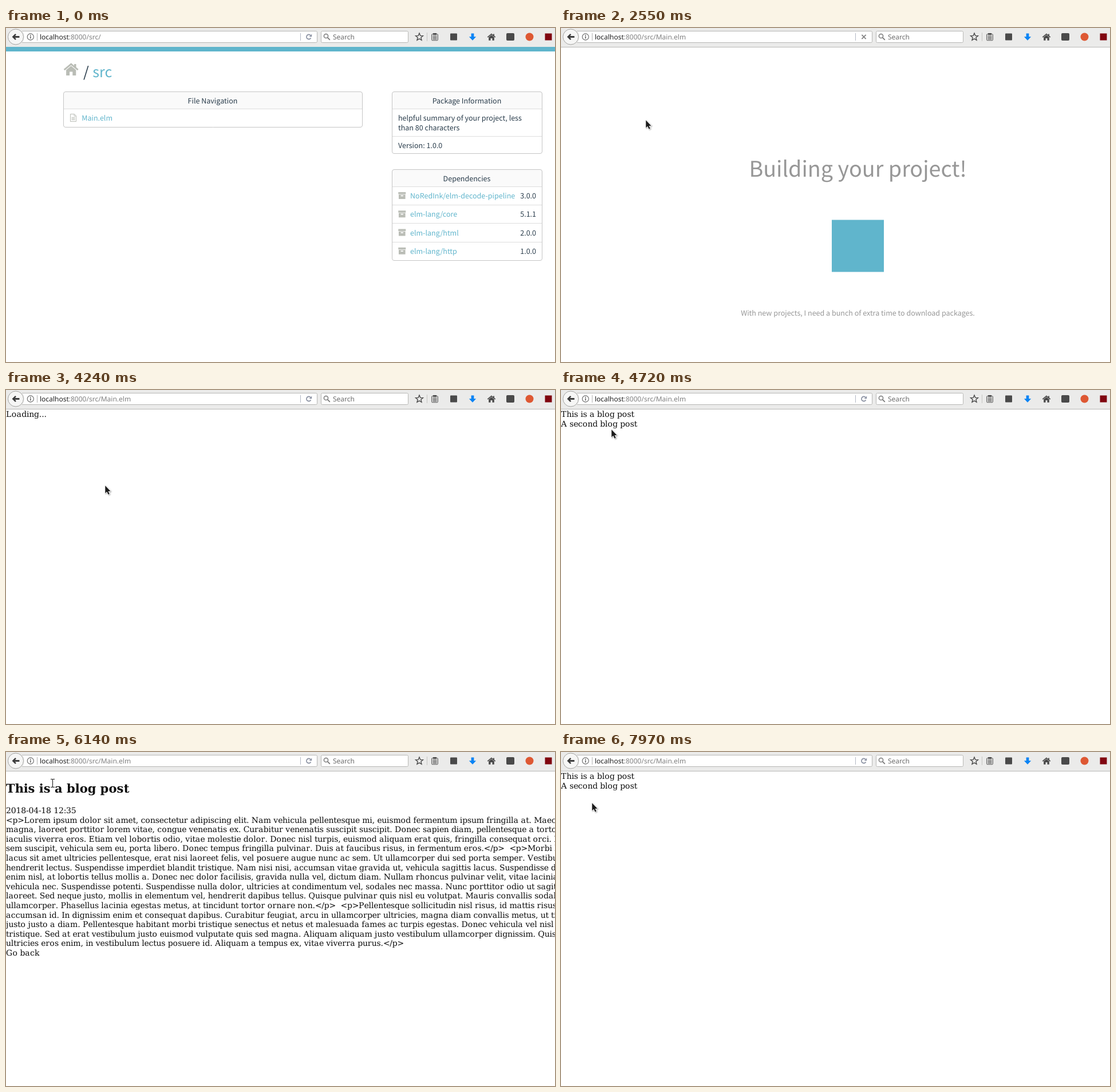
An HTML page with a canvas for the animation above (8000 ms loop, 959 by 584 pixels).

```html
<!DOCTYPE html>
<html lang="en">
<head>
<meta charset="utf-8">
<title>Blog reader</title>
<style>
html, body { margin: 0; width: 100%; height: 100%; overflow: hidden; background: #fff; }
canvas { display: block; }
</style>
</head>
<body>
<canvas id="stage" width="959" height="584"></canvas>
<script>
const ctx = document.getElementById('stage').getContext('2d');
ctx.textRendering = 'geometricPrecision';

const LOOP = 8000;
const ZOOM = 0.875; // the browser window is shown reduced
const UI = '"Noto Sans", "Open Sans", sans-serif';
const SANS = '"Noto Sans CJK JP", "Noto Sans CJK SC", "Noto Sans CJK KR", "Noto Sans CJK", sans-serif';
const SERIF = '"DejaVu Serif", serif';
const BLUE = '#60b5cc', INK = '#293c4b', GREY = '#babdb6', DARK = '#4a4a4a';
const BODY = 12.53; // page text size

const POST = [
  '<p>Lorem ipsum dolor sit amet, consectetur adipiscing elit. Nam vehicula pellentesque mi, euismod fermentum ipsum fringilla at. Maecenas',
  'magna, laoreet porttitor lorem vitae, congue venenatis ex. Curabitur venenatis suscipit suscipit. Donec sapien diam, pellentesque a tortor',
  'iaculis viverra eros. Etiam vel lobortis odio, vitae molestie dolor. Donec nisl turpis, euismod aliquam erat quis, fringilla consequat orci. Nam',
  'sem suscipit, vehicula sem eu, porta libero. Donec tempus fringilla pulvinar. Duis at faucibus risus, in fermentum eros.</p>\u00a0 <p>Morbi lorem',
  'lacus sit amet ultricies pellentesque, erat nisi laoreet felis, vel posuere augue nunc ac sem. Ut ullamcorper dui sed porta semper. Vestibulum',
  'hendrerit lectus. Suspendisse imperdiet blandit tristique. Nam nisi nisi, accumsan vitae gravida ut, vehicula sagittis lacus. Suspendisse dapibus',
  'enim nisl, at lobortis tellus mollis a. Donec nec dolor facilisis, gravida nulla vel, dictum diam. Nullam rhoncus pulvinar velit, vitae lacinia',
  'vehicula nec. Suspendisse potenti. Suspendisse nulla dolor, ultricies at condimentum vel, sodales nec massa. Nunc porttitor odio ut sagittis',
  'laoreet. Sed neque justo, mollis in elementum vel, hendrerit dapibus tellus. Quisque pulvinar quis nisl eu volutpat. Mauris convallis sodales',
  'ullamcorper. Phasellus lacinia egestas metus, at tincidunt tortor ornare non.</p>\u00a0 <p>Pellentesque sollicitudin nisl risus, id mattis risus lacus',
  'accumsan id. In dignissim enim et consequat dapibus. Curabitur feugiat, arcu in ullamcorper ultricies, magna diam convallis metus, ut tincidunt',
  'justo justo a diam. Pellentesque habitant morbi tristique senectus et netus et malesuada fames ac turpis egestas. Donec vehicula vel nisl in',
  'tristique. Sed at erat vestibulum justo euismod vulputate quis sed magna. Aliquam aliquam justo vestibulum ullamcorper dignissim. Quisque',
  'ultricies eros enim, in vestibulum lectus posuere id. Aliquam a tempus ex, vitae viverra purus.</p>',
  'Go back'
];

const PACKAGES = [
  ['NoRedInk/elm-decode-pipeline', '3.0.0'],
  ['elm-lang/core', '5.1.1'],
  ['elm-lang/html', '2.0.0'],
  ['elm-lang/http', '1.0.0']
];

const SHAPES = {
  arrow: 'M0 0V13.2L3 10.4L5.3 15.4L7.5 14.4L5.3 9.6H9.3Z',
  hand: 'M2 1.2Q2 0 3.2 0T4.4 1.2V6Q6 5.2 6.6 6.4Q8.4 5.8 8.9 7.1Q11 6.7 11.2 8.6V12Q11 14 10 15V17.5H4V15.5Q1.5 12.5 .2 10Q-.2 8.4 2 9.4Z',
  beam: 'M-3.5 -7H-1Q0 -7 0 -6V6Q0 7 -1 7H-3.5M3.5 -7H1Q0 -7 0 -6M0 6Q0 7 1 7H3.5',
  cross: 'M-3.6 -3.6L3.6 3.6M-3.6 3.6L3.6 -3.6',
  handle: 'M0 0L4 4',
  back: 'M-7 0L-1 -6L1 -4L-1.4 -1.5H7V1.5H-1.4L1 4L-1 6Z',
  down: 'M-2.5 -6.5H2.5V-.5H6.5L0 6.5L-6.5 -.5H-2.5Z',
  house: 'M-8.6 1L0 -6.2L8.6 1V10.5H2.6V4H-2.6V10.5H-8.6ZM5.4 -9.5H8.8V-2.5L5.4 -5.4Z',
  roof: 'M-12 .6L0 -9.4L12 .6',
  page: 'M.5 .5H7.5L10.5 3.5V13.5H.5ZM7 .5V4H10.5M2.5 6.5H8.5M2.5 8.5H8.5M2.5 10.5H8.5',
  box: 'M0 0H13V3.4H0ZM.7 4.2H12.3V12H.7ZM4.4 5.6V7.2H8.6V5.6Z'
};
for (const k in SHAPES) SHAPES[k] = new Path2D(SHAPES[k]);

function at(x, y, s, draw) {
  ctx.save();
  ctx.translate(x, y);
  ctx.scale(s, s);
  draw();
  ctx.restore();
}

function fill(name, x, y, color, s = 1) {
  at(x, y, s, () => { ctx.fillStyle = color; ctx.fill(SHAPES[name], 'evenodd'); });
}

function stroke(name, x, y, color, width = 1, s = 1) {
  at(x, y, s, () => { ctx.strokeStyle = color; ctx.lineWidth = width; ctx.stroke(SHAPES[name]); });
}

function rect(x, y, w, h, color) {
  ctx.fillStyle = color;
  ctx.fillRect(x, y, w, h);
}

function rounded(x, y, w, h, r, color, line) {
  ctx.beginPath();
  ctx.roundRect(x, y, w, h, r);
  if (color) { ctx.fillStyle = color; ctx.fill(); }
  if (line) { ctx.strokeStyle = line; ctx.lineWidth = 1; ctx.stroke(); }
}

function disc(x, y, r, color, line, width = 1) {
  ctx.beginPath();
  ctx.arc(x, y, r, 0, 7);
  if (color) { ctx.fillStyle = color; ctx.fill(); }
  if (line) { ctx.strokeStyle = line; ctx.lineWidth = width; ctx.stroke(); }
}

function text(str, x, y, size, family, color, align = 'left') {
  ctx.font = `${size}px ${family}`;
  ctx.textAlign = align;
  ctx.fillStyle = color;
  ctx.fillText(str, x, y);
  return ctx.measureText(str).width;
}

const sans = (str, x, y, color = INK, align) => text(str, x, y, BODY, SANS, color, align);

// hinted text: every letter advances by whole pixels before the zoom
const advances = {};
function serif(str, y, font = '16px') {
  const known = advances[font] ??= {};
  at(0, y, ZOOM, () => {
    ctx.font = `${font} ${SERIF}`;
    ctx.textAlign = 'left';
    ctx.fillStyle = '#0c0c0c';
    let x = 0;
    for (const c of str) {
      if (x * ZOOM > 959) break;
      ctx.fillText(c, x, 0);
      x += known[c] ??= Math.round(ctx.measureText(c).width);
    }
  });
}

function home(x, y, s, color) {
  fill('house', x, y, color, s);
  stroke('roof', x, y, color, 2.8, s);
}

function star(x, y) {
  ctx.beginPath();
  for (let i = 0; i < 10; i++) {
    const r = i % 2 ? 3 : 6.8, a = i * Math.PI / 5;
    ctx.lineTo(x + r * Math.sin(a), y - r * Math.cos(a));
  }
  ctx.closePath();
  ctx.strokeStyle = DARK;
  ctx.lineWidth = 1.4;
  ctx.stroke();
}

function reload(x, y) {
  ctx.strokeStyle = ctx.fillStyle = '#8b92a3';
  ctx.lineWidth = 1.8;
  ctx.beginPath();
  ctx.arc(x, y, 4, 0.5, 5.5);
  ctx.stroke();
  ctx.beginPath();
  ctx.moveTo(x + 5.2, y - 5);
  ctx.lineTo(x + 5.2, y - .3);
  ctx.lineTo(x + .5, y - .3);
  ctx.fill();
}

function toolbar(t) {
  rect(0, 0, 959, 33, '#ebebea');
  rect(0, 33, 959, 1, '#b9b9b7');
  rounded(24.5, 5.5, 519, 20, 2, '#fff', '#b7b7b5');
  disc(17, 15.5, 15, '#ebebea');
  disc(17, 15.5, 13.5, '#f6f6f5', '#a3a3a1');
  fill('back', 17, 15.5, '#3c3c3c', .92);
  disc(42.8, 15.5, 5.6, null, '#666', 1.1);
  rect(42, 14.5, 1.6, 4, '#666');
  rect(42, 12, 1.6, 1.6, '#666');
  rect(54, 9, 1, 13, '#b0b0b0');
  rect(514, 9, 1, 13, '#b3b8c4');

  const w = text('localhost', 59, 19.8, 12.03, UI, '#222');
  text(':8000/src/' + (t >= 1660 ? 'Main.elm' : ''), 59 + w, 19.8, 12.03, UI, '#808080');

  if (t >= 1760 && t < 3840) stroke('cross', 529, 15.5, '#858585', 1.8);
  else reload(529, 15.5);

  rounded(550.5, 5.5, 152, 20, 2, '#fff', '#b7b7b5');
  disc(559, 14, 3.6, null, '#777', 1.5);
  stroke('handle', 561.8, 16.8, '#777', 1.8);
  text('Search', 571, 19.8, 12.03, UI, '#6e6e6e');

  star(722, 15.8);
  rect(735, 8, 1, 15, '#c4c4c2');
  rounded(743.7, 10.7, 10.6, 11, 1, null, DARK);
  rect(746, 9, 6, 3, DARK);
  for (let i = 0; i < 3; i++) rect(745.5, 13.4 + i * 2.6, 7, 1.3, DARK);
  rounded(776, 9.5, 12, 12, 1, DARK);
  fill('down', 815, 15.6, '#0a84f5', .95);
  home(848, 15.8, .56, DARK);
  rounded(874, 9, 14, 13, 2, DARK);
  disc(914.5, 15.5, 7, '#de5833');
  rect(941.5, 9.5, 12, 12, '#800610');
}

function panel(x, y, w, h, title, lines) {
  rounded(x + .5, y + .5, w, h, 3.5, '#fff');
  rounded(x + .5, y + .5, w, 30, [3.5, 3.5, 0, 0], '#fafafa');
  for (const ly of lines) rect(x + 1, ly, w - 1, 1, '#dedede');
  rounded(x + .5, y + .5, w, h, 3.5, null, '#c5c5c5');
  sans(title, x + w / 2, y + 20.7, INK, 'center');
}

function files(t) {
  rect(0, 33, 959, 8, BLUE);
  home(113.7, 72.5, 1, GREY);
  text('/', 135, 85.7, 25.07, SANS, INK);
  text('src', 151.3, 85.7, 25.07, SANS, BLUE);

  panel(100, 111, 522, 62, 'File Navigation', [141]);
  stroke('page', 112, 150, GREY);
  const w = sans('Main.elm', 132.3, 161.8, BLUE);
  if (t >= 970) rect(132, 163, w, 1, BLUE);
  if (t >= 1460 && t < 1700) {
    ctx.setLineDash([1, 1]);
    rounded(111.5, 147.5, 76, 20, 0, null, BLUE);
    ctx.setLineDash([]);
  }

  panel(674, 111, 262, 108, 'Package Information', [141, 189]);
  sans('helpful summary of your project, less', 685, 161.8);
  sans('than 80 characters', 685, 179.4);
  sans('Version: 1.0.0', 685, 210);

  panel(674, 247, 262, 159, 'Dependencies', [277, 309, 341, 374]);
  PACKAGES.forEach(([name, version], i) => {
    const y = 298 + i * 32.25;
    fill('box', 685.3, y - 11, GREY);
    sans(name, 706, y, BLUE);
    sans(version, 926, y, INK, 'right');
  });
}

function building(t) {
  text('Building your project!', 518.5, 260, 37.7, SANS, '#979797', 'center');
  const side = t < 3680 ? 91 : 88;
  rect(518.5 - side / 2, 381 - side / 2, side, side, BLUE);
  sans('With new projects, I need a bunch of extra time to download packages.', 518.5, 503, '#979797', 'center');
}

function list() {
  serif('This is a blog post', 47);
  serif('A second blog post', 63.6);
}

function post() {
  serif('This is a blog post', 71.4, 'bold 24px');
  serif('2018-04-18 12:35', 106.9);
  POST.forEach((line, i) => serif(line, 106.9 + (i + 1) * 16.6));
}

// start, end, from, via, to: each a quadratic curve, stepped every 40 ms
const inOut = p => p * p * (3 - 2 * p);
const out = p => 1 - (1 - p) ** 1.6;
const linear = p => p;
const MOVES = [
  [2920, 3240, [148, 161], [178, 192], [226, 211], inOut],
  [3240, 3400, [226, 211], [237, 211], [238, 195], inOut],
  [4040, 4240, [238, 195], [208, 180], [173, 167], linear],
  [4240, 4880, [173, 167], [108, 122], [82, 54], out],
  [4880, 5200, [82, 54], [82, 48], [82, 41], out],
  [6060, 6780, [82, 41], [66, 210], [33, 355], inOut],
  [7530, 7970, [33, 355], [36, 210], [54, 89], inOut]
];

function pointer(t) {
  let pos = MOVES[0][2];
  for (const [a, b, p0, p1, p2, ease] of MOVES) {
    if (t < a) break;
    const p = ease(Math.min(1, Math.floor((t - a) / 40) * 40 / (b - a)));
    const q = 1 - p;
    pos = [0, 1].map(i => q * q * p0[i] + 2 * q * p * p1[i] + p * p * p2[i]);
  }
  return pos.map(Math.round);
}

function overText(t, y) {
  if (t >= 4240 && t < 5600) return y < 65;
  if (t >= 5640 && t < 7240) return (y > 52 && y < 78) || (y > 95 && y < 357);
  return false;
}

function solid(name, x, y) {
  ctx.save();
  ctx.lineJoin = 'round';
  ctx.shadowColor = 'rgba(0,0,0,.35)';
  ctx.shadowBlur = 2;
  ctx.shadowOffsetX = ctx.shadowOffsetY = 1;
  stroke(name, x, y, '#fff', 1.6);
  ctx.restore();
  fill(name, x, y, '#1a1a1a');
}

function cursor(t) {
  if (t < 970) return;
  const [x, y] = pointer(t);
  if (t >= 1010 && t < 2550) return solid('hand', x - 1, y);
  if (!overText(t, y)) return solid('arrow', x + .3, y + .3);
  stroke('beam', x + .5, y + 1.5, '#fff', 2.2);
  stroke('beam', x + .5, y + 1.5, '#1a1a1a', 1.1);
}

const SCENES = [
  [0, files],
  [2550, building],
  [3740, () => {}],
  [3780, () => serif('Loading...', 47)],
  [4480, list],
  [5640, post],
  [7300, list]
];

function frame(now) {
  const t = now % LOOP;
  rect(0, 0, 959, 584, '#fff');
  toolbar(t);
  SCENES.filter(s => s[0] <= t).pop()[1](t);
  cursor(t);
  requestAnimationFrame(frame);
}
requestAnimationFrame(frame);
</script>
</body>
</html>
```
